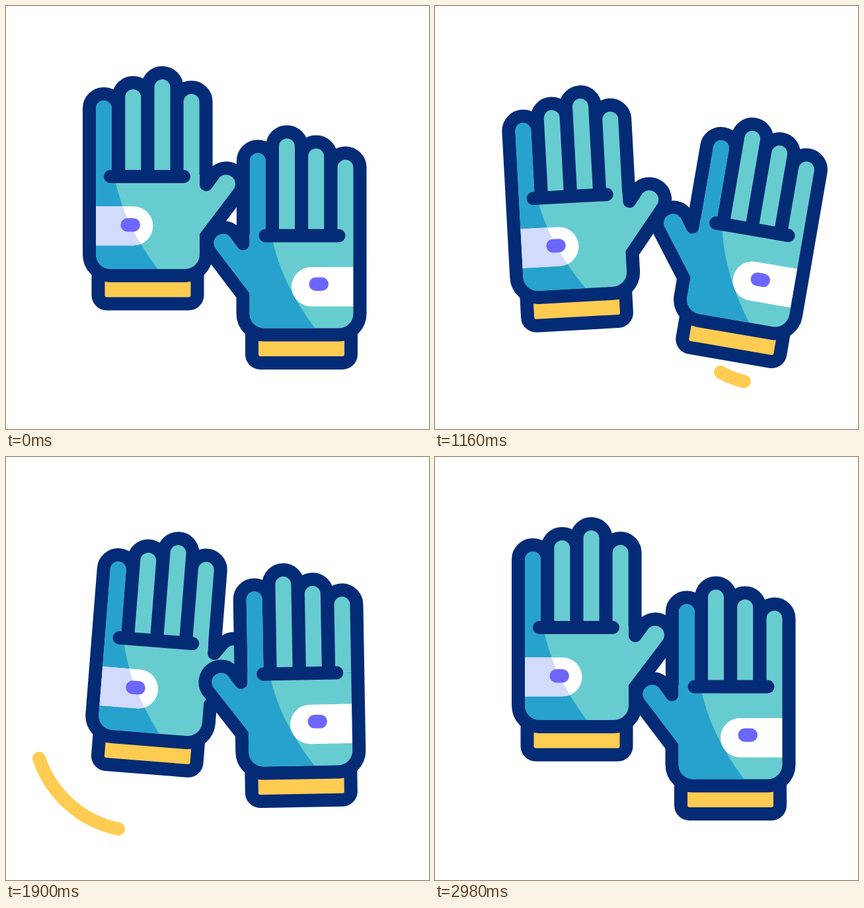
Recreate the animation shown at these times as an HTML page. Size 640 by 640 pixels, loop 3340 ms.

```html
<!DOCTYPE html>
<html lang="en">
<head>
<meta charset="utf-8">
<title>Clapping gloves</title>
<style>
  html, body { margin: 0; width: 100%; height: 100%; overflow: hidden; background: #fff; }
  svg { display: block; width: 100vw; height: 100vh; }
  .dark { fill: #042b76; stroke: #042b76; stroke-width: 40; stroke-linejoin: round; }
  .bar { stroke: #042b76; stroke-width: 20; stroke-linecap: round; }
  .arc { fill: none; stroke: #ffcc52; stroke-width: 20; stroke-linecap: round; }
</style>
</head>
<body>
<svg viewBox="0 0 640 640">
  <defs>
    <path id="hand" d="M136 155a12 12 0 0 1 24 0V258H136Z
      M180.3 138a12 12 0 0 1 24 0V258H180.3Z
      M224.5 123a12 12 0 0 1 24 0V258H224.5Z
      M268.6 145a12 12 0 0 1 24 0V258H268.6Z
      M136 256H293V270A10 10 0 0 0 311 276L323 259.5A14 14 0 0 1 345 276.5L293 345
      V376a22 22 0 0 1-22 22H158a22 22 0 0 1-22-22Z"/>
    <path id="leftShade" d="M120 90H170V258H164Q177 328 229.5 398V410H120Z"/>
    <path id="rightShade" d="M360 90H259.5V258Q246.5 328 194 398V410H360Z"/>
    <clipPath id="handClip"><use href="#hand"/></clipPath>
    <clipPath id="leftClip"><use href="#leftShade"/></clipPath>
    <g id="base">
      <rect class="dark" x="149.5" y="400" width="130" height="40.5" rx="3"/>
      <rect x="149.5" y="400" width="130" height="40.5" rx="3" fill="#ffcc52"/>
      <use href="#hand" class="dark"/>
      <use href="#hand" fill="#67ccd0"/>
    </g>
    <g id="details">
      <path class="bar" d="M158 258H269"/>
      <rect x="173.5" y="321" width="29.5" height="20.5" rx="10.2" fill="#6c66fc"/>
    </g>
  </defs>

  <path class="arc" id="rightArc" pathLength="1" d="M618 411A132 132 0 0 1 490 571Q460 570 432 554"/>
  <path class="arc" id="leftArc" pathLength="1" d="M50 456A161 161 0 0 0 203 566Q240 566 275 556"/>

  <g id="gloves">
    <g id="right">
      <g transform="translate(661.5 89.5) scale(-1 1)">
        <use href="#base"/>
        <g clip-path="url(#handClip)">
          <use href="#rightShade" fill="#27a2cd"/>
          <rect x="80" y="305.5" width="149.5" height="59.5" rx="29.7" fill="#fff"/>
        </g>
        <use href="#details"/>
      </g>
    </g>
    <g id="left">
      <use href="#base"/>
      <g clip-path="url(#handClip)">
        <use href="#leftShade" fill="#27a2cd"/>
        <rect x="80" y="303.3" width="142.5" height="59" rx="29.5" fill="#fff"/>
        <rect x="80" y="303.3" width="142.5" height="59" rx="29.5" fill="#d3dbfd" clip-path="url(#leftClip)"/>
      </g>
      <use href="#details"/>
    </g>
  </g>
</svg>
<script>
const LOOP = 3340;
const BEAT = 450;
const SWAP = 1250;
const $ = id => document.getElementById(id);

const ease = (t, start) => {
  const p = Math.min(1, Math.max(0, (t - start) / BEAT));
  return p * p * (3 - 2 * p);
};

// Rest, clap, part, clap, part, rest: one beat between each pair.
function swing(t, start, clap, part) {
  const stops = [0, clap, part, clap, part, 0];
  let value = 0;
  for (let i = 0; i < 5; i++) {
    value += (stops[i + 1] - stops[i]) * ease(t, start + i * BEAT);
  }
  return value;
}

function pose(id, lift, angle, x, y) {
  $(id).setAttribute('transform', `translate(0 ${lift}) rotate(${angle} ${x} ${y})`);
}

function sweep(id, t, headStart, tailStart) {
  const head = ease(t, headStart);
  const tail = ease(t, tailStart);
  const arc = $(id);
  arc.style.display = head - tail > 0.001 ? '' : 'none';
  arc.setAttribute('stroke-dasharray', `${head - tail} 3`);
  arc.setAttribute('stroke-dashoffset', -tail);
}

function draw(t) {
  pose('left', swing(t, 216, -45, 32), swing(t, 388, 9, -6), 214.5, 428.5);
  pose('right', swing(t, 216, -67, -11), swing(t, 355, -10, 12.3), 447.5, 535);
  sweep('rightArc', t, 439, 813);
  sweep('leftArc', t, 1642, 2030);

  const front = $(t < SWAP ? 'left' : 'right');
  if ($('gloves').lastElementChild !== front) $('gloves').append(front);
}

const begin = performance.now();
function tick() {
  draw((performance.now() - begin) % LOOP);
  requestAnimationFrame(tick);
}
tick();
</script>
</body>
</html>
```
